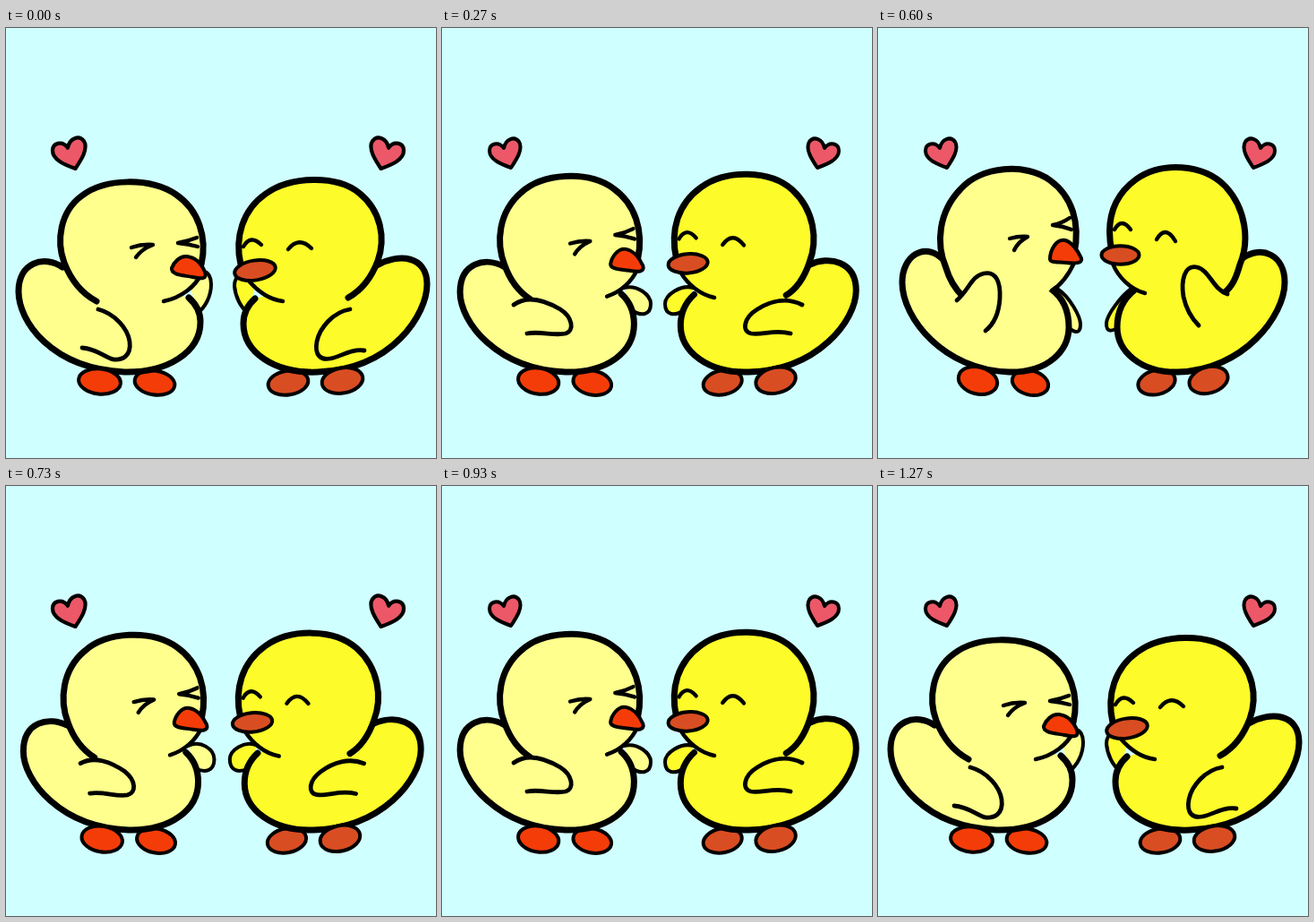
Animation, 480 px wide and 480 px high, one loop 1340 ms. Source, as an HTML page:

```html
<!DOCTYPE html>
<html lang="en">
<head>
<meta charset="utf-8">
<title>Two ducklings</title>
<style>
  html, body { margin: 0; width: 100%; height: 100%; overflow: hidden; background: #d0ffff; }
  svg { display: block; width: 100vw; height: 100vh; }
  path, ellipse { stroke: #000; stroke-linecap: round; stroke-linejoin: round; }
</style>
</head>
<body>
<svg id="stage" viewBox="0 0 480 480"></svg>
<script>
const STEPS = 20, STEP = 1000 / 15, LOOP = 1340;
const stage = document.getElementById('stage');

// Each shape has poses from squashed to stretched; where they sit depends on their number.
const STOPS = { 2: [0, 1], 3: [0, 0.2, 1], 4: [0, 0.45, 0.8, 1] };

const ducks = [{
  fill: '#feff8d', orange: '#f43c08',
  arm: ['M206 290 C216 264 229 270 229 286 C229 300 222 312 214 318',
        'M203 290 C218 286 233 298 233 308 C233 321 222 322 212 315',
        'M200 291 C214 297 229 314 229 323 C229 334 218 333 210 326',
        'M200 291 C214 300 226 322 226 331 C226 344 217 339 210 332'],
  farFoot: ['166 396 22.5 13.5 9', '170 396 20.5 13.5 14'],
  body: ['M63 267 C42 253 14 262 14 294 C14 327 50 380 132 384 C180 385 217 362 217 328 C217 316 212 308 204 301',
         'M69 271 C46 262 17 266 17 300 C17 330 56 381 134 384 C182 385 215 362 215 329 C215 316 211 307 203 299',
         'M71 257 C52 239 27 254 27 284 C27 324 74 382 146 384 C190 385 213 360 213 334 C213 316 206 301 194 292'],
  head: ['M101 305 C84 296 72 280 65 262 C56 238 60 205 85 187 C110 168 160 166 190 186 C215 203 225 234 218 264',
         'M95 300 C86 291 80 282 76 268 C64 240 68 205 92 180 C115 154 165 150 192 170 C217 188 226 218 219 252'],
  chin: ['M218 274 C212 288 196 301 176 305', 'M219 262 C212 277 204 287 194 293'],
  nearFoot: ['104.5 394.5 23.5 14 6', '111.5 393.5 22 15 14'],
  wing: ['M103 314 C122 319 136 336 138 350 C140 366 130 371 120 370 C110 368 102 358 85 357',
         'M80 309 C95 298 115 304 132 314 C146 323 148 338 138 341 C125 344 110 338 95 341',
         'M86 306 C102 299 110 289 122 286 C136 284 139 295 135 312 C130 330 122 341 110 348',
         'M88 304 C102 292 104 277 118 274 C132 271 137 284 136 302 C135 317 130 330 120 338'],
  eyes: ['M140 245 Q152 241 164 242 Q151 247 145 256 M213 234 Q203 238 192 240 Q203 241 214 244',
         'M147 235 Q158 232 167 233 Q156 239 152 248 M214 212 Q205 218 195 220 Q206 221 216 225'],
  beak: ['M185 268 C187 262 194 254 202 255 C211 256 218 263 222 272 C225 281 218 280 208 278 C199 276 184 276 185 268Z',
         'M192 258 C192 248 199 235 209 237 C216 239 223 248 227 257 C229 263 219 263 210 262 C201 261 192 262 192 258Z']
}, {
  fill: '#fdfb2a', orange: '#d94d22',
  arm: ['M278 288 C268 266 255 274 255 288 C256 300 262 312 270 318',
        'M281 290 C266 286 249 298 249 308 C249 321 260 322 270 315',
        'M284 291 C270 297 252 314 252 323 C252 334 262 333 272 326',
        'M284 290 C270 300 256 320 255 329 C254 342 264 338 272 332'],
  farFoot: ['315 396 22.5 13.5 -9', '311 395.5 21 13.5 -14'],
  body: ['M414 265 C438 251 470 254 470 286 C470 319 432 381 348 384 C300 386 265 362 265 330 C265 317 270 309 278 302',
         'M411 268 C434 259 466 264 466 297 C466 329 424 382 346 384 C300 386 266 362 266 331 C266 317 271 308 279 300',
         'M407 257 C428 242 454 253 454 284 C454 321 408 382 335 384 C292 385 267 360 267 334 C267 316 274 302 287 292'],
  head: ['M382 301 C398 292 409 276 415 260 C424 235 419 204 394 184 C369 164 318 165 290 185 C264 203 255 234 262 264',
         'M387 295 C396 288 400 278 404 264 C415 238 411 202 388 177 C363 151 316 149 288 169 C262 188 254 216 261 250'],
  chin: ['M270 281 C280 293 293 303 309 305', 'M262 263 C268 278 282 292 298 296'],
  nearFoot: ['375.5 393.5 23 14 -10', '369 393 22 14.5 -16'],
  wing: ['M384 314 C365 317 350 335 347 350 C344 366 352 371 362 369 C374 367 384 358 400 360',
         'M402 309 C386 301 368 304 352 314 C337 323 334 339 345 341 C358 343 372 336 389 341',
         'M386 290 C372 290 362 275 348 275 C334 275 334 292 338 304 C344 321 354 330 367 336',
         'M390 297 C374 292 370 270 356 267 C342 264 338 282 341 300 C344 314 350 324 358 332'],
  eyes: ['M265 244 Q273 230 285 242 M315 247 Q327 232 341 246',
         'M264 225 Q272 211 282 225 M311 236 Q321 219 332 238'],
  beak: ['278 270.5 23 11 -9', '270.5 253.5 21 10.2 0']
}];

function add(tag, attrs) {
  const el = document.createElementNS('http://www.w3.org/2000/svg', tag);
  for (const k in attrs) el.setAttribute(k, attrs[k]);
  return stage.appendChild(el);
}

const numbers = s => s.match(/-?[\d.]+/g).map(Number);

// Blends the poses of one shape into a path or number string.
function blend(poses, p) {
  const stops = STOPS[poses.length];
  let i = 0;
  while (i < stops.length - 2 && p > stops[i + 1]) i++;
  const k = (p - stops[i]) / (stops[i + 1] - stops[i]);
  const to = numbers(poses[i + 1]);
  let n = 0;
  return poses[i].replace(/-?[\d.]+/g, v => (+v + (to[n++] - v) * k).toFixed(2));
}

function line(poses, width, fill = 'none') {
  const el = add('path', { fill, 'stroke-width': width });
  return p => el.setAttribute('d', blend(poses, p));
}

function oval(poses, fill) {
  const el = add('ellipse', { fill, 'stroke-width': 4 });
  return p => {
    const [x, y, rx, ry, turn] = numbers(blend(poses, p));
    el.setAttribute('rx', rx);
    el.setAttribute('ry', ry);
    el.setAttribute('transform', `translate(${x} ${y}) rotate(${turn})`);
  };
}

function makeDuck(d) {
  const face = d.head.map((h, i) => h + d.chin[i].replace('M', ' L'));
  return [
    line(d.arm, 4, d.fill),
    oval(d.farFoot, d.orange),
    line(d.body, 7, d.fill),
    line(face, 0, d.fill),
    line(d.head, 7),
    line(d.chin, 4.5),
    oval(d.nearFoot, d.orange),
    line(d.wing, 4.8, d.fill),
    line(d.eyes, 4.4),
    d.beak[0][0] === 'M' ? line(d.beak, 4, d.orange) : oval(d.beak, d.orange)
  ];
}

function makeHeart(x, flip) {
  const el = add('path', {
    d: 'M7 16 C-4 12 -17 7 -17 -3 C-17 -11 -7 -14 -1 -6 C1 -16 11 -20 16 -13 C21 -5 13 7 7 16Z',
    fill: '#ec5868', 'stroke-width': 4
  });
  return s => el.setAttribute('transform', `translate(${x} 140) scale(${flip * s} ${s})`);
}

const parts = ducks.flatMap(makeDuck);
const hearts = [makeHeart(70, 1), makeHeart(426, -1)];

// Stretch over one bounce: [phase, amount].
const bounce = [[0, 0], [0.1, 0.45], [0.22, 0.85], [0.35, 1], [0.48, 0.93],
  [0.55, 0.8], [0.6, 0.45], [0.7, 0.33], [0.8, 0.2], [0.85, 0], [1, 0]];

function stretch(phase) {
  const i = bounce.findIndex(b => b[0] > phase);
  const [a, u] = bounce[i - 1], [b, v] = bounce[i];
  return u + (v - u) * (phase - a) / (b - a);
}

// Steps run at 15 per second, rounded to hundredths.
const stepStart = i => Math.round(i * STEP / 10) * 10;

function draw(time) {
  const t = time % LOOP;
  let step = STEPS - 1;
  while (step > 0 && stepStart(step) > t) step--;
  const p = stretch(step * 3 % STEPS / STEPS);
  parts.forEach(set => set(p));
  hearts.forEach(set => set(step % 5 < 2 ? 1.06 : 1));
}

const start = performance.now();
function tick() {
  draw(performance.now() - start);
  requestAnimationFrame(tick);
}
tick();
</script>
</body>
</html>
```
